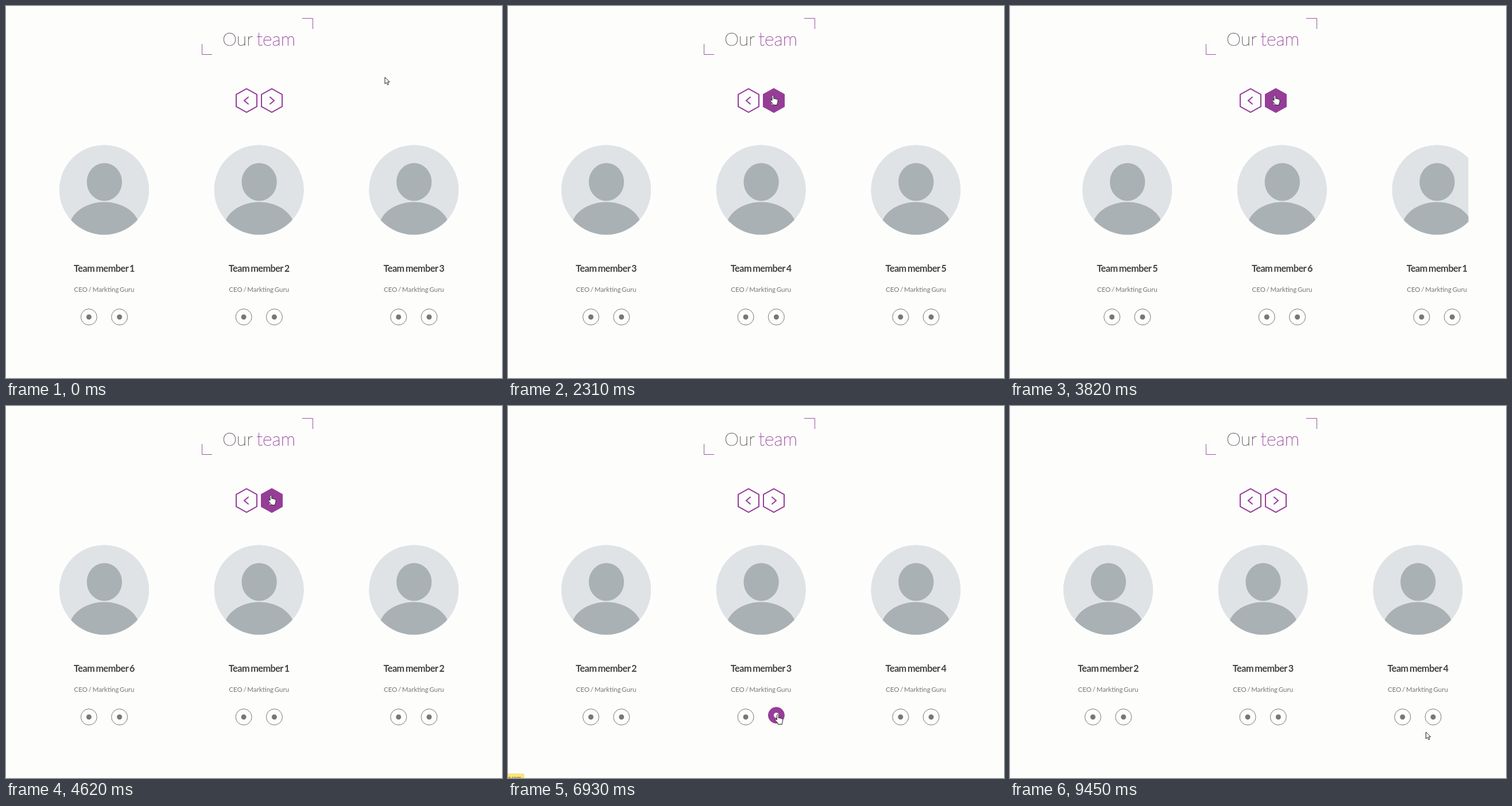
These frames come from a looping animation (864x648 px, 9.66 s). An HTML page:

```html
<!DOCTYPE html>
<html lang="en">
<head>
<meta charset="utf-8">
<title>Our team</title>
<style>
  html, body { margin: 0; width: 100%; height: 100%; overflow: hidden; background: #fdfdfc; }
  svg { display: block; width: 864px; height: 648px; font-family: Lato, sans-serif; }
  .title { font-size: 32px; font-weight: 200; stroke-width: .6; }
  .name { font-size: 16.3px; font-weight: 700; letter-spacing: -.55px; fill: #444; }
  .role { font-size: 11.5px; fill: #777; }
  .name, .role { text-anchor: middle; word-spacing: -1.2px; }
  .ring { fill: #963d98; fill-opacity: 0; stroke: #777; }
  .dot { fill: #777; }
  .hex { fill: #963d98; stroke: #963d98; stroke-width: 2; stroke-linejoin: round; }
  .chevron { fill: none; stroke: #963d98; stroke-width: 2; stroke-linecap: round; }
  .cursor { fill: #fff; stroke: #222; stroke-linejoin: round; }
</style>
</head>
<body>
<svg viewBox="0 0 864 648">
  <defs>
    <clipPath id="view"><rect x="83.5" y="230" width="715" height="340"/></clipPath>
    <clipPath id="round"><circle cy="320.2" r="78.3"/></clipPath>
    <g id="avatar" clip-path="url(#round)">
      <circle cy="320.2" r="78.3" fill="#e0e3e6"/>
      <ellipse cx=".4" cy="306.5" rx="30.7" ry="33" fill="#a9b1b5"/>
      <ellipse cx=".4" cy="386.5" rx="61" ry="45" fill="#a9b1b5"/>
    </g>
  </defs>
  <path d="M516 21.5H534.5V40M341.500 66V84.500H359" fill="none" stroke="#9a56a0"/>
  <text class="title" x="377" y="69" fill="#6b6169" stroke="#6b6169">Our</text>
  <text class="title" x="436.5" y="69" fill="#97459b" stroke="#97459b">team</text>
  <g id="buttons"></g>
  <g clip-path="url(#view)"><g id="track"></g></g>
  <g id="status">
    <path d="M0 640H25Q28.5 640 28.5 643V648H0Z" fill="#fbe57c"/>
    <text x="-4" y="651" font-size="9" fill="#555">or.com</text>
  </g>
  <path class="cursor" id="arrow" d="M0 0V11.6L2.7 9.1 4.6 13.3 6.5 12.5 4.7 8.3H8.2Z"/>
  <path class="cursor" id="hand" d="M-1.5 9V1.3a1.4 1.4 0 0 1 2.8 0V6l1-.3 1.8.5 1.8.4 1.4.5q1.2.6 1.2 2v3.2L7.4 14.5V17H.2v-1.8L-4.5 10q-.6-1.6.9-1.8z"/>
</svg>
<script>
const LOOP = 9660, STEP = 269.7, SLIDE = 250;
const clicks = [1485, 1994, 2914, 3674, 4184, 4884, 5402];
const $ = id => document.getElementById(id);

// Cursor way points: time, x, y
const path = [
  [390, 660, 124], [520, 632, 127], [700, 545, 143], [850, 483, 155], [1010, 461.5, 155.5],
  [5400, 461.5, 155.5], [5590, 424.5, 238.5], [6000, 418, 380], [6400, 413, 490],
  [6520, 414, 538], [6620, 422, 543], [6760, 470, 537.5], [7410, 470, 537.5],
  [7700, 440, 546], [8000, 412, 547], [8270, 390, 552], [8410, 390, 552],
  [8700, 430, 546], [8950, 510, 552], [9370, 719, 575], [9450, 724.5, 568]
];

const buttons = [419, 463].map((x, i) => ({ x, y: 164.7, r: 19, dir: i ? 1 : -1 }));
$('buttons').innerHTML = buttons.map(b => `<g transform="translate(${b.x} ${b.y})">
  <path class="hex" d="M0 -20.5L18 -10.5V10.5L0 20.5L-18 10.5V-10.5Z"/>
  <path class="chevron" d="M${-3 * b.dir} -6L${4 * b.dir} 0L${-3 * b.dir} 6"/></g>`).join('');

const icon = x => `<g class="icon" transform="translate(${x} 541.7)">
  <circle class="ring" r="14"/><circle class="dot" r="4.5"/></g>`;
$('track').innerHTML = Array.from({ length: 10 }, (_, k) => `<g transform="translate(${171 + k * STEP} 0)">
  <use href="#avatar"/>
  <text class="name" y="463">Team member ${k % 6 + 1}</text>
  <text class="role" y="498">CEO / Markting Guru</text>
  ${icon(-26.6)}${icon(26.7)}</g>`).join('');

const hexes = document.querySelectorAll('.hex');
const chevrons = document.querySelectorAll('.chevron');
// Only the middle card at rest (the ninth) is ever hovered
const icons = [...document.querySelectorAll('.icon')].slice(16, 18).map((el, i) => ({
  el, dx: i ? 26.7 : -26.6, x: i ? 467.4 : 414.1, y: 541, r: 15
}));

function cursorAt(t) {
  const i = path.findIndex(p => p[0] > t);
  if (i < 1) return (i ? path[path.length - 1] : path[0]).slice(1);
  const [a, b] = [path[i - 1], path[i]];
  const p = (t - a[0]) / (b[0] - a[0]);
  return [a[1] + (b[1] - a[1]) * p, a[2] + (b[2] - a[2]) * p];
}

const over = (o, t) => {
  const [x, y] = cursorAt(t);
  return Math.hypot(x - o.x, y - o.y) < o.r;
};

// Share of the last 150 ms spent over the object: a fade that depends on time alone
function hover(o, t) {
  let n = 0;
  for (let k = 0; k < 15; k++) n += over(o, t - k * 10);
  return n / 15;
}

// CSS "ease": cubic-bezier(.25, .1, .25, 1)
function ease(x) {
  if (x <= 0 || x >= 1) return x <= 0 ? 0 : 1;
  const curve = (u, a, b) => 3 * u * (1 - u) ** 2 * a + 3 * u * u * (1 - u) * b + u ** 3;
  let lo = 0, hi = 1;
  for (let i = 0; i < 24; i++) {
    const mid = (lo + hi) / 2;
    if (curve(mid, .25, .25) < x) lo = mid; else hi = mid;
  }
  return curve(lo, .1, 1);
}

const mix = (a, b, p) => `rgb(${a.map((v, i) => Math.round(v + (b[i] - v) * p))})`;
const WHITE = [255, 255, 255], PURPLE = [150, 61, 152], GREY = [119, 119, 119];

function draw(now) {
  const t = now % LOOP;
  const shift = clicks.reduce((s, c) => s + ease((t - c) / SLIDE), 0);
  $('track').setAttribute('transform', `translate(${-shift * STEP} 0)`);

  buttons.forEach((b, i) => {
    const h = hover(b, t);
    hexes[i].style.fillOpacity = h;
    chevrons[i].style.stroke = mix(PURPLE, WHITE, h);
  });
  icons.forEach(o => {
    const h = hover(o, t), [ring, dot] = o.el.children;
    o.el.setAttribute('transform', `translate(${o.dx} ${541.7 - 3 * h})`);
    ring.style.fillOpacity = h;
    ring.style.stroke = mix(GREY, PURPLE, h);
    dot.style.fill = mix(GREY, WHITE, h);
  });

  const linked = [...buttons, ...icons].some(o => over(o, t));
  const [x, y] = cursorAt(t);
  for (const [id, shown] of [['hand', linked], ['arrow', !linked]]) {
    $(id).style.display = shown ? '' : 'none';
    $(id).setAttribute('transform', `translate(${x} ${y})`);
  }
  $('status').style.display = t > 6600 && t < 8150 ? '' : 'none';
}

const start = performance.now();
function tick() {
  draw(performance.now() - start);
  requestAnimationFrame(tick);
}
tick();
</script>
</body>
</html>
```
